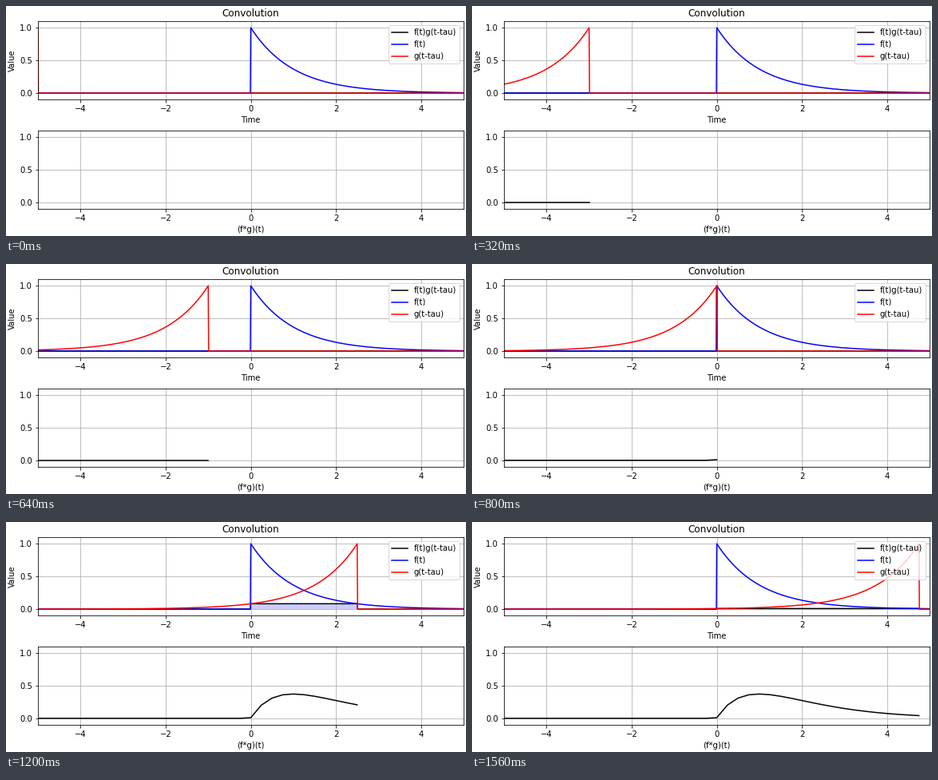
Write a matplotlib script that moves like this. It is 576 by 288 pixels and loops after 1600 ms.

```python
import numpy as np
import matplotlib.pyplot as plt
from matplotlib.animation import FuncAnimation

WIDTH, HEIGHT, DPI = 576, 288, 72
FRAMES = 40
STEP = 0.01

# Layout in pixels
LEFT, RIGHT = 40.02, 573
TOP, BOTTOM = 19, 254
GAP = 38.44
AXES_HEIGHT = (BOTTOM - TOP - GAP) / 2

t = np.round(np.linspace(-5, 5, 1001), 2)
taus = -5 + 0.25 * np.arange(FRAMES)


def decay(x):
    """Exponential decay that starts at zero."""
    return np.where(x >= 0, np.exp(-np.abs(x)), 0.0)


f = decay(t)
result = np.array([np.sum(f * decay(tau - t)) * STEP for tau in taus])

fig, (top, bottom) = plt.subplots(2, 1, figsize=(WIDTH / DPI, HEIGHT / DPI),
                                  dpi=DPI)
fig.subplots_adjust(left=LEFT / WIDTH, right=RIGHT / WIDTH,
                    top=1 - TOP / HEIGHT, bottom=1 - BOTTOM / HEIGHT,
                    hspace=GAP / AXES_HEIGHT)
for ax in (top, bottom):
    ax.set_xlim(-5, 5)
    ax.set_ylim(-0.1, 1.1)
    ax.set_yticks([0, 0.5, 1])
    ax.grid(True)

top.set_title("Convolution")
top.set_xlabel("Time")
top.set_ylabel("Value")
bottom.set_xlabel("(f*g)(t)")

product_line, = top.plot(t, 0 * t, "k", label="f(t)g(t-tau)")
top.plot(t, f, "b", label="f(t)")
shifted_line, = top.plot(t, 0 * t, "r", label="g(t-tau)")
area = top.fill_between(t, 0 * t, facecolor="b", alpha=0.2)
result_line, = bottom.plot([], [], "k")
top.legend(loc="upper right")


def update(i):
    g = decay(taus[i] - t)
    product = f * g
    product_line.set_ydata(product)
    shifted_line.set_ydata(g)
    outline = np.column_stack([t, product])
    area.set_verts([np.vstack([[t[0], 0], outline, [t[-1], 0]])])
    result_line.set_data(taus[:i + 1], result[:i + 1])
    return product_line, shifted_line, area, result_line


anim = FuncAnimation(fig, update, frames=FRAMES, interval=40,
                     repeat=True, repeat_delay=0, blit=False)
plt.show()
```
